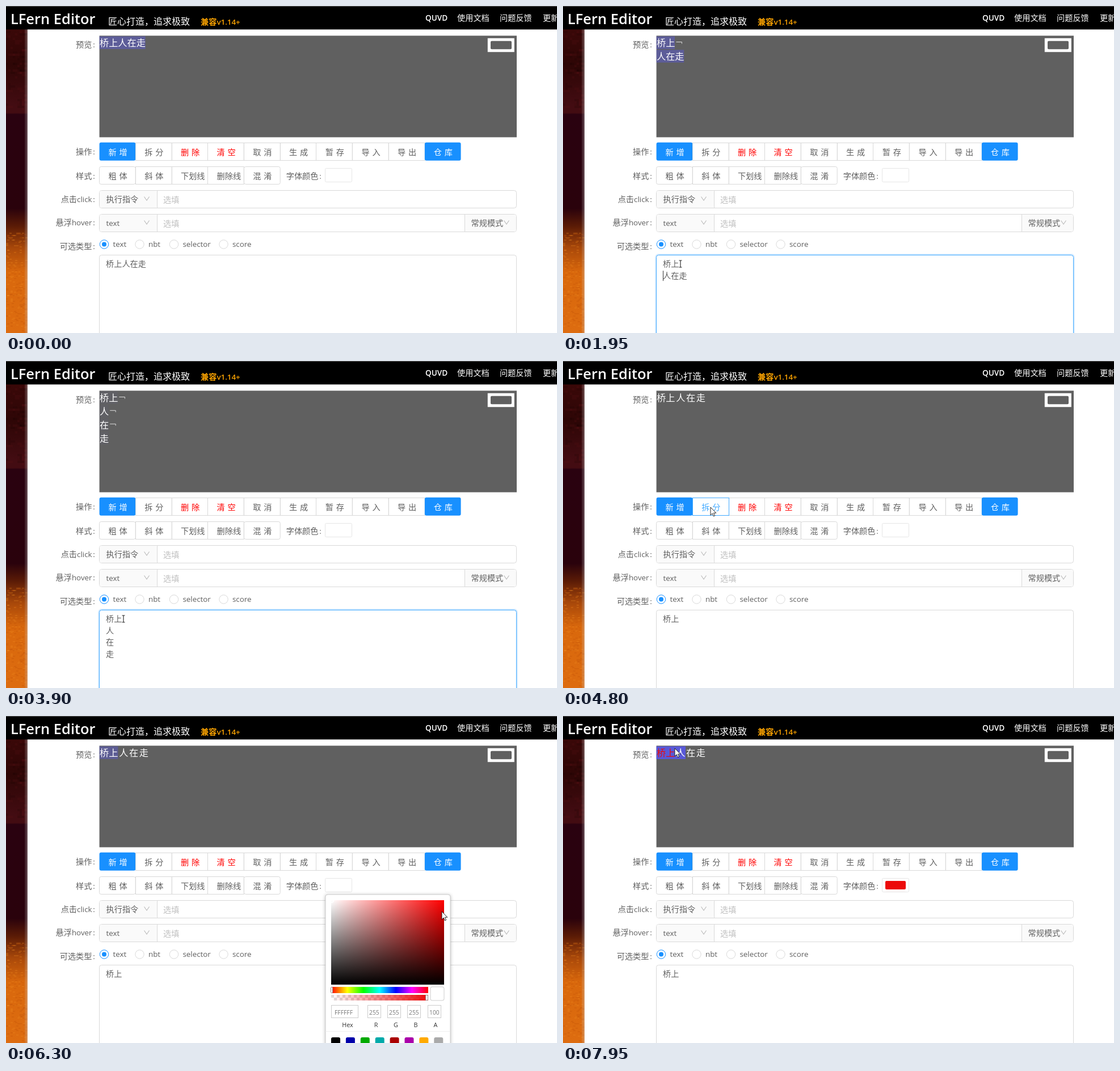
An HTML page for the animation above (8000 ms loop, 971 by 577 pixels).

```html
<!DOCTYPE html>
<html lang="zh">
<head>
<meta charset="utf-8">
<title>LFern Editor</title>
<style>
html, body { margin: 0; width: 100%; height: 100%; overflow: hidden; background: #fff; }
svg { display: block; width: 971px; height: 577px; }
text { font-family: "Open Sans", "Noto Sans CJK SC", "Noto Sans CJK", sans-serif; white-space: pre; }
</style>
</head>
<body>
<svg id="stage" viewBox="0 0 971 577" xmlns="http://www.w3.org/2000/svg">
  <defs>
    <linearGradient id="lava" x1="0" y1="0" x2="0" y2="1">
      <stop offset="0" stop-color="#3a0808"/><stop offset=".12" stop-color="#2e0606"/>
      <stop offset=".25" stop-color="#430c12"/><stop offset=".275" stop-color="#430c12"/>
      <stop offset=".28" stop-color="#2a0210"/><stop offset=".59" stop-color="#2a020c"/>
      <stop offset=".65" stop-color="#5c1c06"/><stop offset=".72" stop-color="#a8480a"/>
      <stop offset=".8" stop-color="#d9680c"/><stop offset="1" stop-color="#dd6c10"/>
    </linearGradient>
    <linearGradient id="edge"><stop offset="0" stop-color="#ccc" stop-opacity="0"/><stop offset="1" stop-color="#ccc" stop-opacity=".4"/></linearGradient>
    <linearGradient id="sat"><stop offset="0" stop-color="#fff"/><stop offset="1" stop-color="#fff" stop-opacity="0"/></linearGradient>
    <linearGradient id="val" x1="0" y1="0" x2="0" y2="1"><stop offset="0" stop-opacity="0"/><stop offset="1"/></linearGradient>
    <linearGradient id="hue"></linearGradient>
    <linearGradient id="alpha"><stop offset="0" stop-color="#ec0a0a" stop-opacity="0"/><stop offset="1" stop-color="#ec0a0a"/></linearGradient>
    <pattern id="check" width="10" height="10" x="573" y="492" patternUnits="userSpaceOnUse">
      <rect width="10" height="10" fill="#fff"/><path d="M0 0h5v5h-5zM5 5h5v5h-5z" fill="#ddd"/>
    </pattern>
    <filter id="soft" x="-10%" y="-10%" width="120%" height="120%"><feGaussianBlur stdDeviation="3"/></filter>
  </defs>
  <g id="page"></g>
  <g id="live"></g>
</svg>
<script>
const $ = id => document.getElementById(id);
const INK = '#606060', LINE = '#d9d9d9', BLUE = '#1890ff', RED = '#ec0a0a';

const rect = (x, y, w, h, fill, more = '') =>
  `<rect x="${x}" y="${y}" width="${w}" height="${h}" fill="${fill}" ${more}/>`;
const box = (x, y, w, h, fill = '#fff', stroke = LINE, r = 4) =>
  rect(x + .5, y + .5, w, h, fill, `stroke="${stroke}" rx="${r}"`);
// Latin runs are set slightly smaller than the Chinese ones
const text = (x, y, s, size = 14.2, fill = INK, more = '') =>
  `<text x="${x}" y="${y}" font-size="${size}" fill="${fill}" ${more}>` +
  s.replace(/[!-~][ -~]*/g, m => `<tspan font-size="${size * .94}">${m}</tspan>`) + '</text>';
const label = (x, y, s) => text(x, y, s, 14.2, INK, 'text-anchor="end"') + text(x + 1.7, y, ':');
const chevron = (x, y) =>
  `<path d="M${x - 4.5} ${y - 3.5}l4.5 6.5l4.5 -6.5" fill="none" stroke="#bbb" stroke-width="1.1"/>`;

function lava() {
  let seed = 7, s = rect(0, 41, 38, 536, 'url(#lava)');
  const rnd = () => (seed = seed * 16807 % 2147483647) / 2147483647;
  for (let i = 0; i < 70; i++) {
    const x = 4 * Math.floor(rnd() * 9), y = 44 + 4 * Math.floor(rnd() * 35);
    s += rect(x, y, 4 + 4 * Math.floor(rnd() * 3), 4, rnd() < .5 ? '#1c0204' : '#5a1214', 'opacity=".2"');
  }
  for (let i = 0; i < 220; i++) {
    const x = 2 * Math.floor(rnd() * 18), y = 400 + 2 * Math.floor(rnd() * 88);
    s += rect(x, y, 4, 2, rnd() < .5 ? '#f08a20' : '#bd4c06', 'opacity=".25"');
  }
  return s + rect(32, 41, 6, 536, 'url(#edge)');
}

function buttons(y, names) {
  const w = 63.7;
  return names.map((name, i) => {
    const x = 164.6 + i * w, solid = /新增|仓库/.test(name);
    const ink = solid ? '#fff' : /删除$|清空/.test(name) ? '#f00' : INK;
    const end = i == 0 || i == names.length - 1;
    return (solid ? rect(x, y - .3, w, 32, BLUE, 'rx="3"') : box(Math.floor(x), y, w, 31, '#fff', LINE, end ? 3 : 0)) +
      text(x + 15.9, y + 21.7, name, 14.2, ink, name.length == 2 ? 'letter-spacing="4.8"' : '');
  }).join('');
}

function page() {
  let s = lava() + rect(38, 41, 933, 536, '#fff');
  s += rect(0, 0, 971, 41, '#000') + rect(0, 0, 971, 1, '#555') + rect(0, 41, 971, 1, '#000', 'opacity=".4"');
  s += text(8, 32, 'LFern Editor', 27.1, '#fff', 'font-weight="600"');
  s += text(180, 33.2, '匠心打造，追求极致', 16, '#fff');
  s += text(343, 32.7, '兼容v1.14+', 14.2, '#ffa500', 'font-weight="600"');
  s += text(739, 26.3, 'QUVD', 14.5, '#fff', 'font-weight="600"');
  [[795, '使用文档'], [870, '问题反馈'], [946, '更新日志']].forEach(([x, n]) => s += text(x, 26.3, n, 14.2, '#fff'));
  [[73.3, '预览'], [262.3, '操作'], [304.7, '样式'], [345.7, '点击click'], [387.3, '悬浮hover'], [429.3, '可选类型']]
    .forEach(([y, n]) => s += label(151.5, y, n));
  s += rect(164.6, 52.4, 735.4, 179.2, '#606060') + rect(848.8, 56.8, 47, 24.4, '#fff') + rect(854, 61.8, 37, 14.4, '#606060', 'rx="2"');
  s += buttons(241, ['新增', '拆分', '删除', '清空', '取消', '生成', '暂存', '导入', '导出', '仓库']);
  s += buttons(283, ['粗体', '斜体', '下划线', '删除线', '混淆']);
  s += label(550.5, 304.7, '字体颜色') + box(562, 286, 47, 24, '#fff', '#e6e6e6', 2);
  s += box(164, 325, 735, 31) + rect(165, 326, 101, 30, '#fafafa', 'rx="3"') + rect(266, 326, 1, 30, LINE);
  s += text(176.5, 346, '执行指令') + chevron(248, 340) + text(277, 346.5, '选填', 14.2, '#bfbfbf');
  s += box(164, 367, 735, 31) + rect(165, 368, 101, 30, '#fafafa', 'rx="3"') + rect(266, 368, 1, 30, LINE);
  s += rect(808, 368, 91, 30, '#fafafa', 'rx="3"') + rect(808, 368, 1, 30, LINE);
  s += text(176.5, 387.5, 'text') + chevron(248, 382) + text(277, 388.5, '选填', 14.2, '#bfbfbf');
  s += text(819.5, 387.5, '常规模式') + chevron(882, 382);
  [[173, 188.5, 'text'], [235.5, 251, 'nbt'], [296, 311.5, 'selector'], [383.5, 399, 'score']].forEach(([cx, x, n], i) => {
    s += `<circle cx="${cx}" cy="420.5" r="7.7" fill="#fff" stroke="${i ? LINE : BLUE}"/>`;
    if (!i) s += `<circle cx="${cx}" cy="420.5" r="4" fill="${BLUE}"/>`;
    s += text(x, 425, n);
  });
  return s;
}

function picker(picked) {
  const ink = picked ? RED : '#fff';
  const values = picked ? ['EC0A0A', '236', '10', '10', '100'] : ['FFFFFF', '255', '255', '255', '100'];
  let s = rect(563, 316, 220, 280, '#000', 'opacity=".3" filter="url(#soft)"') + box(562.5, 314.5, 220, 290, '#fff', '#ccc');
  for (const f of ['#f00', 'url(#sat)', 'url(#val)']) s += rect(573, 325, 199, 149, f);
  const [cx, cy] = picked ? [764, 337] : [574, 326];
  s += `<circle cx="${cx}" cy="${cy}" r="3" fill="none" stroke="#fff" stroke-width="1.5"/>`;
  s += rect(573, 478, 171, 11, 'url(#hue)') + rect(573, 492, 171, 10, 'url(#check)') + rect(573, 492, 171, 10, 'url(#alpha)');
  s += box(572, 478, 3, 10, '#fff', '#888', 1) + box(739, 492, 4, 9, '#fff', '#888', 1);
  s += rect(748, 478, 24, 24, ink, 'rx="3" stroke="#0003"');
  [[573, 47, 'Hex', 602], [637, 23, 'R', 652], [672, 23, 'G', 687], [707, 23, 'B', 722], [743, 23, 'A', 757]].forEach(([x, w, n, c], i) => {
    s += box(x, 510, w, 22, '#fff', '#ccc', 0);
    s += text(x + (i ? 3 : 6), 526.5, values[i], 11, '#777');
    s += text(c, 549, n, 11.5, '#333', 'text-anchor="middle"');
  });
  s += rect(563, 556, 219, 1, '#eee');
  ['#000', '#00a', '#0a0', '#0aa', '#a00', '#a0a', '#fa0', '#aaa'].forEach((c, i) =>
    s += rect(573 + i * 25.9, 567, 16, 16, c, 'rx="3"'));
  return s;
}

// [time, value...] tables, read with linear steps between
const PULSE = [[0, .4], [250, 0], [700, .9], [1150, 0], [1250, 0], [1700, .9], [2150, 0], [2550, .9], [3000, 0],
  [3450, .9], [3880, .03], [3950, .03], [4350, .9], [4800, 0], [5150, .9], [5520, .12], [5580, .12], [6000, .9],
  [6500, 0], [6800, .7], [7050, .2], [7150, 0], [7500, .9], [7700, .3], [7950, .85]];
const MOUSE = [[150, 330, 570], [600, 207, 455], [4350, 207, 455], [4800, 260, 258], [4950, 260, 258], [5400, 190, 87],
  [5550, 190, 87], [5900, 585, 300], [6000, 585, 300], [6150, 797, 345], [6300, 768, 345], [6450, 764, 337],
  [6600, 764, 337], [6750, 615, 378], [7000, 202, 68], [7100, 202, 68], [7350, 432, 254], [7650, 206, 70], [7950, 197, 57]];

function at(table, t) {
  const i = table.findIndex(k => k[0] >= t);
  if (i < 0) return table[table.length - 1].slice(1);
  if (!i) return table[0].slice(1);
  const a = table[i - 1], b = table[i], p = (t - a[0]) / (b[0] - a[0]);
  return a.slice(1).map((v, j) => v + (b[j + 1] - v) * p);
}

const FOCUS = 600, KEYS = [1950, 2400, 3300], SPLIT = 4800, OPEN = 6000, PICK = 6450, CLOSE = 7200, ADD = 7500;
const STATES = ['桥上人在走', '桥上/人在走', '桥上/人/在走', '桥上/人/在/走'].map(s => s.split('/'));

function preview(t, lines) {
  const mark = (y, w) => rect(164.6, y, w, 22.5, '#5858ee', `opacity="${at(PULSE, t)[0]}"`);
  if (t >= SPLIT)
    return mark(53.5, t >= ADD ? 51.4 : 32.9) + text(165, 71.3, '桥上', 16.2, t >= PICK ? RED : '#fff') +
      [...'人在走'].map((c, i) => text(199.3 + i * 17.7, 71.3, c, 16.2, '#fff')).join('');
  return lines.map((line, i) => {
    const y = 71.3 + 23.8 * i, w = line.length * 16.2;
    const turn = `<path d="M${165 + w + 2} ${y - 7.8}h10v3" fill="none" stroke="#ddd"/>`;
    return mark(y - 17.8, w) + text(165, y, line, 16.2, '#fff') + (i < lines.length - 1 ? turn : '');
  }).join('');
}

function editor(t, lines) {
  const focus = t >= FOCUS && t < SPLIT;
  let s = focus ? rect(163.5, 438.5, 737, 160, 'none', 'rx="5" stroke="#1890ff" stroke-opacity=".16" stroke-width="3"') : '';
  s += box(164, 439, 735, 160, '#fff', focus ? '#40a9ff' : LINE);
  lines.forEach((line, i) => s += text(176, 460 + 20.6 * i, line));
  const n = lines.length - 1, since = t - [FOCUS, ...KEYS][n];
  if (focus && since % 1060 < 530) s += rect(n ? 176 : 204, 446.5 + 20.6 * n, 1, 18, '#333');
  return s;
}

function pointer(t) {
  if (t < 150) return '';
  const [x, y] = at(MOUSE, t);
  const shape = y > 440
    ? '<path d="M-2.5 -6h2l.5 .7l.5 -.7h2M0 -5.5v11M-2.5 6h2l.5 -.7l.5 .7h2" fill="none" stroke="#222" stroke-width="1.1"/>'
    : '<path d="M0 0v14l3.2 -3l2.2 5l2.2 -1l-2.1 -4.8h4.3z" fill="#fff" stroke="#111" stroke-width=".9"/>';
  return `<g transform="translate(${x} ${y})">${shape}</g>`;
}

function draw(t) {
  const lines = t >= SPLIT ? ['桥上'] : STATES[KEYS.filter(k => t >= k).length];
  let s = preview(t, lines) + editor(t, lines);
  if (t >= 4650 && t < OPEN)
    s += box(228, 241, 64, 31, '#fff', '#40a9ff', 0) + text(244.2, 262.7, '拆分', 14.2, '#40a9ff', 'letter-spacing="4.8"');
  if (t >= PICK) s += rect(568, 291, 36, 15, RED, 'rx="2"');
  if (t >= OPEN && t < CLOSE) s += picker(t >= PICK);
  $('live').innerHTML = s + pointer(t);
}

$('hue').innerHTML = ['#f00', '#ff0', '#0f0', '#0ff', '#00f', '#f0f', '#f00']
  .map((c, i) => `<stop offset="${i / 6}" stop-color="${c}"/>`).join('');
$('page').innerHTML = page();

// The screen refreshes in hard steps of 150 ms
const LOOP = 8000, STEP = 150;
let start = null, shown = -1;
function tick(now) {
  if (start === null) start = now;
  const t = Math.floor((now - start) % LOOP / STEP) * STEP;
  if (t !== shown) draw(shown = t);
  requestAnimationFrame(tick);
}
draw(0);
requestAnimationFrame(tick);
</script>
</body>
</html>
```
